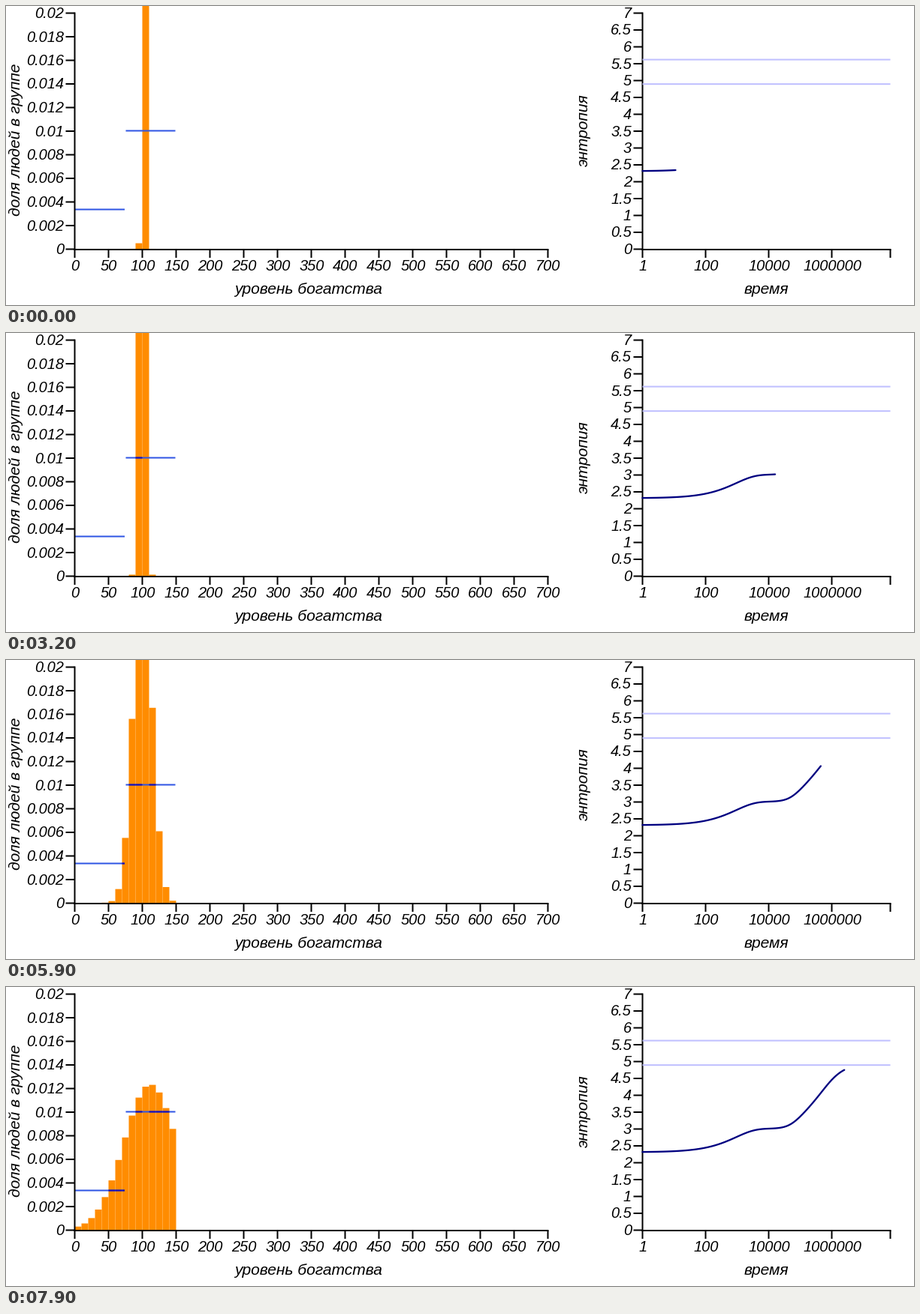
A matplotlib script that plays this animation: 1209x399 px, repeating every 8000 ms.

```python
import numpy as np
import matplotlib.pyplot as plt
from matplotlib.animation import FuncAnimation
from matplotlib.patches import Rectangle

W, H, DPI = 1209, 399, 64
FRAMES, STEP = 80, 100
PT = 72 / DPI            # points per pixel
BASE = 324               # y of zero in both charts
LEFT, RIGHT = 91.5, 847.5  # x origins of the two charts
BINS, BIN_W, START = 15, 9, 10
DECADE, UNIT = 42, 45    # pixels per decade of time, per unit of entropy
DENSITY = 1575           # pixel height of a bar holding everyone

plt.rcParams["font.family"] = "Liberation Sans"
plt.rcParams["font.style"] = "italic"

fig = plt.figure(figsize=(W / DPI, H / DPI), dpi=DPI, facecolor="white")
ax = fig.add_axes([0, 0, 1, 1])
ax.set_xlim(0, W)
ax.set_ylim(H, 0)
ax.axis("off")


def line(xs, ys, color="black", width=2, z=3, cap="butt"):
    return ax.plot(xs, ys, color=color, lw=width * PT, zorder=z, snap=False,
                   solid_capstyle=cap, solid_joinstyle="round")[0]


def label(x, y, text, ha="center", size=20, rotation=0):
    ax.text(x, y, text, size=size * PT, ha=ha, va="baseline",
            rotation=rotation, rotation_mode="anchor")


def y_axis(x, count, step, title, title_x, title_y):
    line([x, x], [8.5, BASE + 1.5])
    for i in range(count):
        y = BASE + 0.5 - 315 * i / (count - 1)
        line([x - 12, x], [y, y])
        label(x - 14.5, y + 6.5, f"{i * step:.4g}", ha="right")
    label(title_x, title_y, title, size=21, rotation=90)


def x_axis(x0, x1, ticks, title, title_x):
    line([x0 - 1, x1 + 1], [BASE + 1] * 2)
    for x, text in ticks:
        line([x, x], [BASE + 1, 336])
        label(x + 0.5, 353, text)
    label(title_x, 384, title, size=21)


y_axis(LEFT, 11, 0.002, "доля людей в группе", 19, 178.5)
x_axis(LEFT, LEFT + 630, [(LEFT + 45 * i, str(50 * i)) for i in range(15)],
       "уровень богатства", 402.5)

y_axis(RIGHT, 15, 0.5, "энтропия", 775, 166)
decades = [(RIGHT + 2 * DECADE * i, str(100 ** i)) for i in range(4)]
x_axis(RIGHT, RIGHT + 330, decades + [(RIGHT + 330, "")], "время", 1012.5)

for limit in (5.61, 4.885):
    line([RIGHT, RIGHT + 330], [BASE - UNIT * limit] * 2, "#bfbfff")


def shares(t):
    """Share of people in each wealth group at time t."""
    u = t / 1e6
    mean = 9.5 + 0.19 * u ** 2
    var = 0.1 + 3.75 * u + 0.88 * u ** 2
    p = np.exp(-(np.arange(BINS) - mean) ** 2 / (2 * var))
    p /= p.sum()
    waiting = p[START - 1] * np.exp(-(t / 2820) ** 0.842)
    p[START - 1] -= waiting
    p[START] += waiting
    return p


def entropy(t):
    p = shares(t)
    return np.log(10) - np.sum(p * np.log(p + 1e-12))


def tip_x(k):
    return 924.7 + 3.57 * k - 0.0145 * k ** 2 - 33.2 * np.exp(-k / 3)


def time_at(x):
    return 10 ** ((x - RIGHT) / DECADE)


bars = [ax.add_patch(Rectangle((LEFT + BIN_W * b, BASE), BIN_W, 0, fc="#ff8c00",
                               lw=0, snap=False, zorder=1)) for b in range(BINS)]

# Flat reference levels, darker where a grown bar lies behind them.
overlaps = []
for x0, x1, h in ((LEFT, 158, 52.5), (159.5, 225.5, 157.5)):
    line([x0, x1], [BASE - h] * 2, "#2f55e4", z=2)
    for b in range(BINS):
        a, c = max(x0, LEFT + BIN_W * b), min(x1, LEFT + BIN_W * (b + 1))
        if a < c and b != START:
            overlaps.append((b, h, line([a, c], [BASE - h] * 2, "#1c0cae", z=2.5)))

curve = line([], [], "#000080", 2.3, z=4, cap="round")
grid = np.arange(RIGHT, RIGHT + 330, 3)


def draw(k):
    tip = tip_x(k)
    heights = DENSITY * shares(time_at(tip))
    for bar, h in zip(bars, heights):
        bar.set_y(BASE - h)
        bar.set_height(h)
    for b, h, seg in overlaps:
        seg.set_visible(bool(heights[b] > h))
    xs = np.append(grid[grid < tip], tip)
    curve.set_data(xs, [BASE - UNIT * entropy(time_at(x)) for x in xs])
    return [*bars, curve]


anim = FuncAnimation(fig, draw, frames=FRAMES, interval=STEP, repeat=True,
                     repeat_delay=0, blit=False)
plt.show()
```
